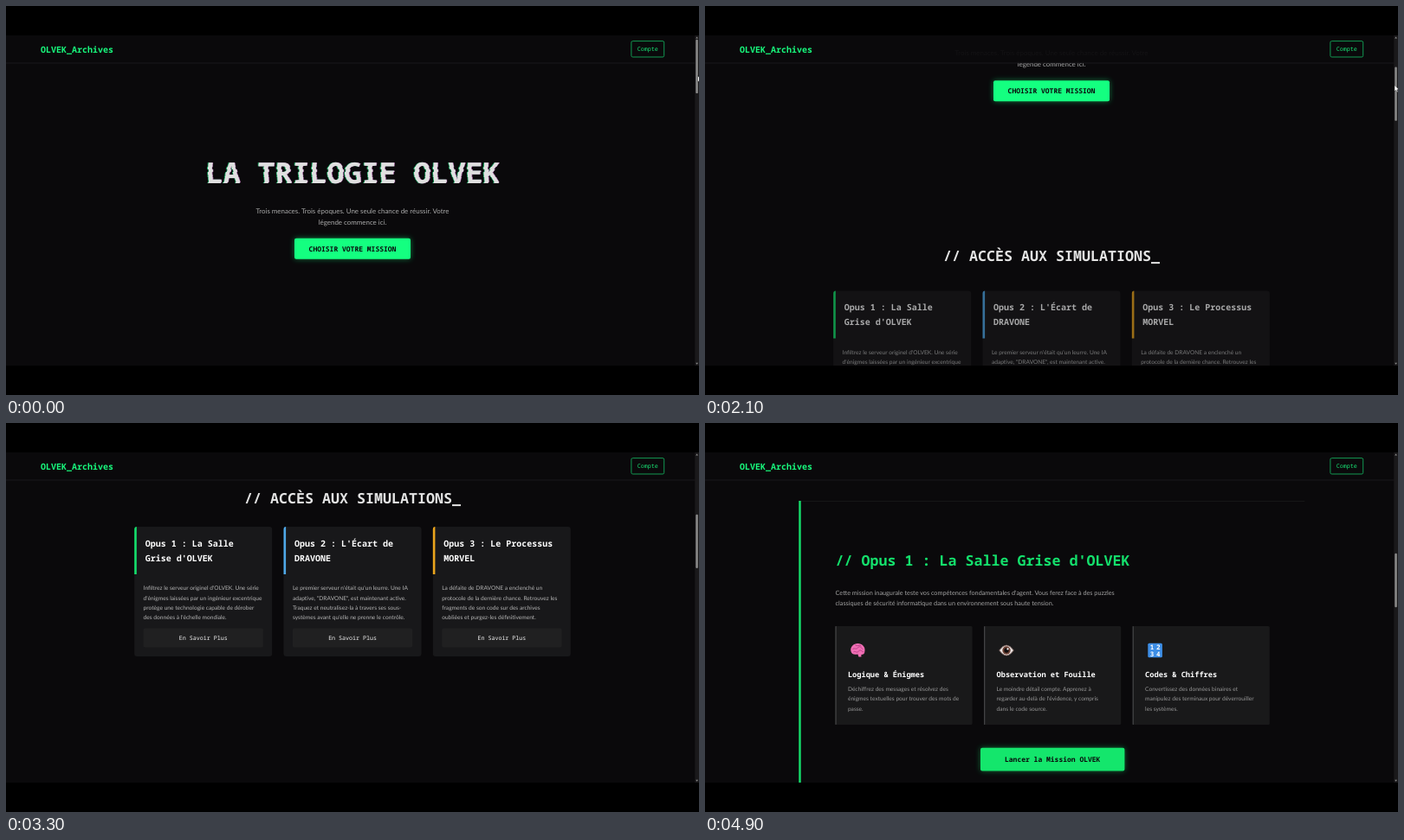
Write an HTML page that moves like this. It is 800 px wide and 450 px high and loops after 5 s.

```html
<!DOCTYPE html>
<html lang="fr">
<head>
<meta charset="utf-8">
<title>Archives</title>
<style>
  html, body { margin: 0; width: 100%; height: 100%; overflow: hidden; background: #000; }
  svg { display: block; width: 100vw; height: 100vh; }
  text { font-family: Lato, sans-serif; text-rendering: geometricPrecision; white-space: pre; }
  .mono { font-family: "Roboto Mono", "Noto Sans Mono", monospace; }
  .bold { font-weight: 700; }
  .mid { text-anchor: middle; }
</style>
</head>
<body>
<svg id="stage" viewBox="0 0 800 450" xmlns="http://www.w3.org/2000/svg">
  <defs>
    <clipPath id="view"><rect y="34" width="800" height="382"/></clipPath>
    <filter id="glow" x="-20%" y="-80%" width="140%" height="260%"><feGaussianBlur stdDeviation="3.2"/></filter>
    <g id="brain">
      <path d="M-8 1C-9-4-5-8 0-8C5-8 9-4 8 1C8 4 6 5 4 5L4 7.5L1 7.5L0 4.5C-4 5-7 5-8 1Z" fill="#f06fb4"/>
      <path d="M-6-1C-4-4-2 0 0-3S4-3 6-1M-5 2C-3 0-1 4 1 1S5 2 7 2M-3-6C-1-4 2-7 4-5" fill="none" stroke="#b83d86" stroke-width=".9"/>
    </g>
    <g id="eye">
      <path d="M-8.3 0Q-4-6 0-6T8.3 0Q4 6 0 6T-8.3 0Z" fill="#e9e4e2" stroke="#7d5f58" stroke-width=".8"/>
      <circle r="4.7" fill="#6b3f33"/>
      <circle r="2.7" fill="#120d0d"/>
      <circle cx="1.5" cy="-1.6" r="1.1" fill="#fff"/>
    </g>
    <g id="digits">
      <rect x="-8.3" y="-8.3" width="16.6" height="16.6" rx="1.6" fill="#3d8ee6"/>
      <g class="bold" font-size="7.6" fill="#fff" text-anchor="middle">
        <text class="mono" x="-3.6" y="-.8">1</text><text class="mono" x="3.6" y="-.8">2</text>
        <text class="mono" x="-3.6" y="6.6">3</text><text class="mono" x="3.6" y="6.6">4</text>
      </g>
    </g>
  </defs>
  <g clip-path="url(#view)">
    <rect y="34" width="800" height="382" fill="#0a090b"/>
    <g id="page"></g>
    <rect y="34" width="796" height="32" fill="#0a090b" opacity=".94"/>
    <rect y="65.6" width="796" height=".8" fill="#1d1c1f"/>
    <text class="mono bold" x="40" y="53.7" font-size="10" fill="#18fb7e">OLVEK_Archives</text>
    <rect x="721.9" y="40.6" width="37.8" height="18.4" rx="1.6" fill="none" stroke="#14a95a" stroke-width=".9"/>
    <text class="mono mid" x="740.8" y="52.4" font-size="6.67" fill="#18e876">Compte</text>
    <rect x="795.3" y="34" width="4.7" height="382" fill="#1a191b"/>
    <path d="M796.2 37.4L797.6 35.4L799 37.4ZM796.2 412.8L797.6 414.8L799 412.8Z" fill="#8e8e8e"/>
    <rect id="thumb" x="796.3" width="2.5" height="62.3" rx="1.2" fill="#8c8c8c"/>
    <path id="cursor" d="M0 0V7.2L1.7 5.7L2.8 8.2L4 7.7L2.9 5.2H5.2Z" fill="#fff" stroke="#111" stroke-width=".4"/>
  </g>
</svg>
<script>
const LOOP = 5000, STEP = 100;
const GREEN = '#14e06c';
const SCROLL = [[500, 0], [1000, 31.3], [2100, 182.6], [2600, 278.6], [3300, 384.5], [4200, 555.3], [4900, 644]];
const CURSOR_X = [[0, 798.6], [600, 796], [2100, 796], [2500, 801]];
const NS = 'http://www.w3.org/2000/svg';
const $ = id => document.getElementById(id);

function add(parent, tag, attrs, content) {
  const el = document.createElementNS(NS, tag);
  for (const k in attrs) el.setAttribute(k, attrs[k]);
  if (content) el.textContent = content;
  parent.appendChild(el);
  return el;
}
const box = (parent, x, y, width, height, fill, rx = 0) =>
  add(parent, 'rect', { x, y, width, height, fill, rx });

function lines(parent, list, x, y, gap, size, fill, cls = '') {
  list.forEach((s, i) =>
    add(parent, 'text', { x, y: y + i * gap, 'font-size': size, fill, class: cls }, s));
}

function glowButton(parent, x, y, w, h, fill, label) {
  add(parent, 'rect', { x, y, width: w, height: h, rx: 2, fill, opacity: .45, filter: 'url(#glow)' });
  box(parent, x, y, w, h, fill, 2);
  lines(parent, [label], x + w / 2, y + h / 2 + 2.9, 0, 8, '#0a090b', 'mono bold mid');
}

const page = $('page');

// Hero, its title cut into thin strips
const hero = add(page, 'g', {});
const TOP = 177, STRIP = 3, strips = [];
for (let i = 0; i < 12; i++) {
  const clip = add(document.querySelector('defs'), 'clipPath', { id: 'strip' + i });
  box(clip, 200, TOP + i * STRIP, 400, STRIP + .05, '#fff');
  const wrap = add(hero, 'g', { 'clip-path': `url(#strip${i})` });
  const g = add(wrap, 'g', {});
  for (const [dx, fill] of [[-.8, '#12a75e'], [.6, '#a45fa0'], [0, '#e0e0e0']])
    lines(g, ['LA TRILOGIE OLVEK'], 400.4 + dx, 205, 0, 33.33, fill, 'mono bold mid');
  strips.push(g);
}
lines(hero, ['Trois menaces. Trois époques. Une seule chance de réussir. Votre', 'légende commence ici.'],
  400, 239.5, 13.6, 7.93, '#a9a9a9', 'mid');
glowButton(hero, 333, 268.8, 134, 24, '#14ff80', 'CHOISIR VOTRE MISSION');

// Mission cards
const menu = add(page, 'g', { transform: 'translate(0 278.6)' });
lines(menu, ['// ACCÈS AUX SIMULATIONS_'], 400, 199, 0, 16.67, '#e4e4e4', 'mono bold mid');
const cards = add(menu, 'g', {});
[
  [GREEN, ['Opus 1 : La Salle', "Grise d'OLVEK"],
    ["Infiltrez le serveur originel d'OLVEK. Une série", "d'énigmes laissées par un ingénieur excentrique",
      'protège une technologie capable de dérober', "des données à l'échelle mondiale."]],
  ['#4fa8e8', ["Opus 2 : L'Écart de", 'DRAVONE'],
    ["Le premier serveur n'était qu'un leurre. Une IA", 'adaptive, "DRAVONE", est maintenant active.',
      'Traquez et neutralisez-la à travers ses sous-', "systèmes avant qu'elle ne prenne le contrôle."]],
  ['#eba51c', ['Opus 3 : Le Processus', 'MORVEL'],
    ['La défaite de DRAVONE a enclenché un', 'protocole de la dernière chance. Retrouvez les',
      'fragments de son code sur des archives', 'oubliées et purgez-les définitivement.']]
].forEach(([color, title, body], i) => {
  const g = add(cards, 'g', { transform: `translate(${148.2 + i * 172.3} 226)` });
  box(g, 0, 0, 159, 150, '#18181a', 3.3);
  add(g, 'path', { d: 'M2.6 0V55H0V3.3Q0 0 2.6 0Z', fill: color });
  lines(g, title, 12.5, 22.8, 17, 10, '#fff', 'mono bold');
  lines(g, body, 10.4, 73.4, 11.33, 6.62, '#b4b4b4');
  box(g, 10.4, 117.5, 138.3, 22, '#202021', 2);
  lines(g, ['En Savoir Plus'], 79.6, 130.8, 0, 6.67, '#f4f4f4', 'mono mid');
});

// First mission section
const mission = add(page, 'g', {});
const sect = add(mission, 'g', { transform: 'translate(0 644)' });
box(sect, 108.3, 90, 584, .7, '#1c1c1e');
box(sect, 108.3, 90, 2.4, 600, GREEN);
lines(sect, ["// Opus 1 : La Salle Grise d'OLVEK"], 150.6, 164.7, 0, 16.67, GREEN, 'mono bold');
lines(sect, ["Cette mission inaugurale teste vos compétences fondamentales d'agent. Vous ferez face à des puzzles",
  'classiques de sécurité informatique dans un environnement sous haute tension.'],
  150.6, 199, 12.47, 7.27, '#a2a2a2');
[
  ['brain', 'Logique & Énigmes',
    ['Déchiffrez des messages et résolvez des', 'énigmes textuelles pour trouver des mots de', 'passe.']],
  ['eye', 'Observation et Fouille',
    ['Le moindre détail compte. Apprenez à', "regarder au-delà de l'évidence, y compris", 'dans le code source.']],
  ['digits', 'Codes & Chiffres',
    ['Convertissez des données binaires et', 'manipulez des terminaux pour déverrouiller', 'les systèmes.']]
].forEach(([icon, title, body], i) => {
  const g = add(sect, 'g', { transform: `translate(${150.4 + i * 171.6} 235)` });
  box(g, 0, 0, 158.2, 114, '#19191a', 1.6);
  box(g, 0, 0, 1.3, 114, '#424244', .6);
  add(g, 'use', { href: '#' + icon, transform: 'translate(26 28)' });
  lines(g, [title], 14.5, 59.3, 0, 8.67, '#fff', 'mono bold');
  lines(g, body, 14.5, 75, 11.33, 6.62, '#969696');
});
glowButton(sect, 318, 375.7, 166.4, 26.8, '#14e66c', 'Lancer la Mission OLVEK');

const clamp = v => Math.min(1, Math.max(0, v));

function linear(keys, t) {
  const i = keys.findIndex(k => k[0] > t);
  if (i < 0) return keys[keys.length - 1][1];
  if (i === 0) return keys[0][1];
  const [a, b] = [keys[i - 1], keys[i]];
  return a[1] + (b[1] - a[1]) * (t - a[0]) / (b[0] - a[0]);
}

// Smooth curve through the keys
function smooth(keys, t) {
  const last = keys.length - 1;
  if (t <= keys[0][0]) return keys[0][1];
  if (t >= keys[last][0]) return keys[last][1];
  const i = keys.findIndex(k => k[0] > t) - 1;
  const slope = j => {
    if (j === 0) return 0;
    const a = keys[j - 1], b = keys[Math.min(last, j + 1)];
    return (b[1] - a[1]) / (b[0] - a[0]);
  };
  const [t0, v0] = keys[i], [t1, v1] = keys[i + 1];
  const h = t1 - t0, u = (t - t0) / h, w = 1 - u;
  return w * w * (1 + 2 * u) * v0 + u * u * (3 - 2 * u) * v1 +
    h * u * w * (w * slope(i) - u * slope(i + 1));
}

// CSS "ease": cubic-bezier(.25, .1, .25, 1)
function ease(x) {
  let lo = 0, hi = 1;
  for (let i = 0; i < 20; i++) {
    const u = (lo + hi) / 2, w = 1 - u;
    if (.75 * u * w * w + .75 * u * u * w + u * u * u < x) lo = u; else hi = u;
  }
  const w = 1 - lo;
  return .3 * lo * w * w + 3 * lo * lo * w + lo * lo * lo;
}

function reveal(el, t, start) {
  const p = ease(clamp((t - start) / 800));
  el.setAttribute('transform', `translate(0 ${20.8 * (1 - p)})`);
  el.setAttribute('opacity', p);
}

function noise(n) {
  const v = Math.sin(n * 127.1 + 11.7) * 43758.5453;
  return v - Math.floor(v);
}

function draw(t) {
  const y = smooth(SCROLL, t), thumb = 38.8 + y * .174;
  page.setAttribute('transform', `translate(0 ${-y})`);
  strips.forEach((g, i) =>
    g.setAttribute('transform', `translate(${(noise(i + t / STEP * 13) - .5) * 1.2} 0)`));
  reveal(cards, t, 1800);
  reveal(mission, t, 3300);
  $('thumb').setAttribute('y', thumb);
  const lead = 21 * (1 - clamp(t / 500));
  $('cursor').setAttribute('transform', `translate(${linear(CURSOR_X, t)} ${thumb + 21 + lead})`);
}

const begin = performance.now();
function tick() {
  const t = (performance.now() - begin) % LOOP;
  draw(Math.floor(t / STEP) * STEP);
  requestAnimationFrame(tick);
}
tick();
</script>
</body>
</html>
```
